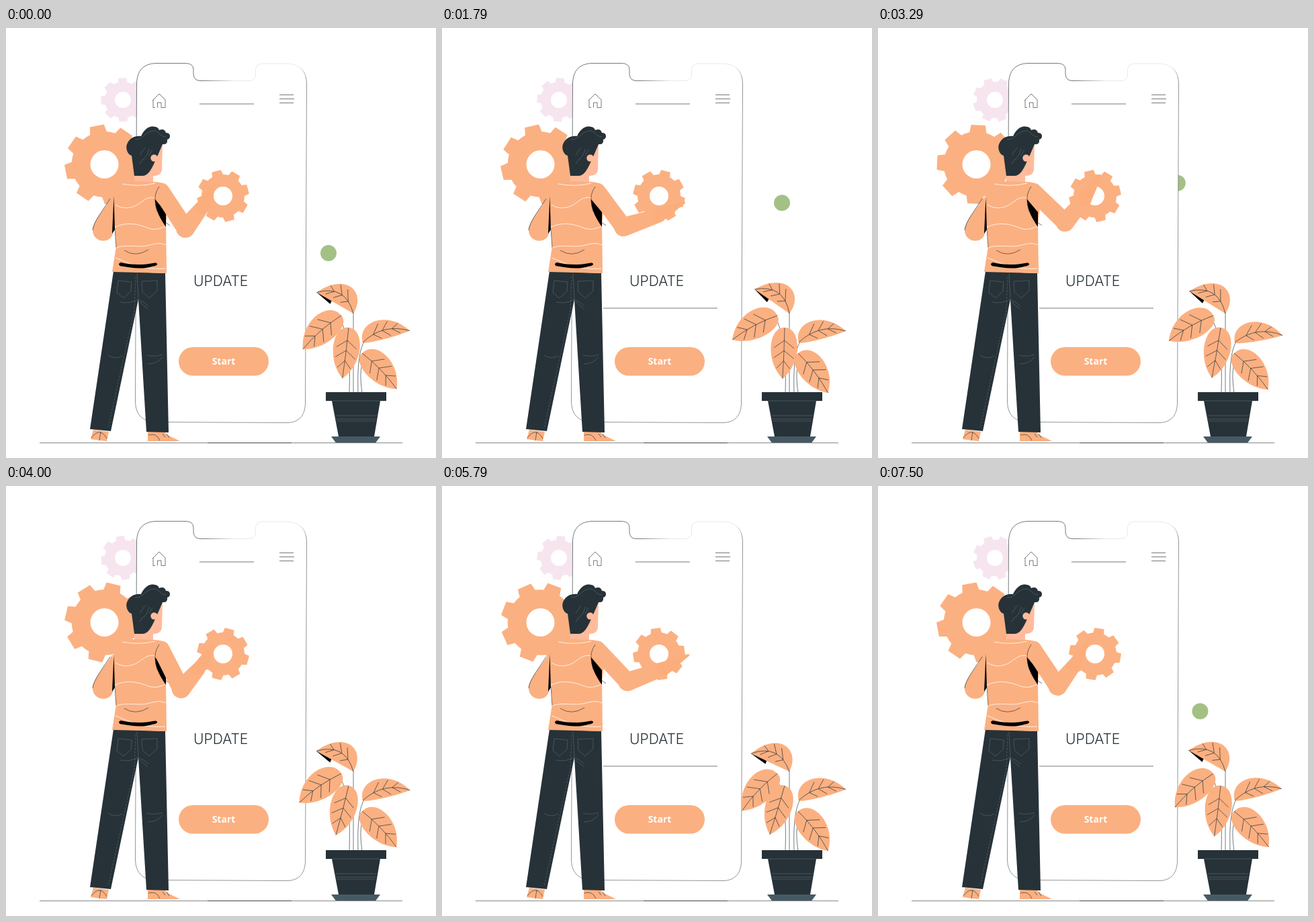
Recreate the animation shown at these times as an HTML page. Size 640 by 640 pixels, loop 7710 ms.

```html
<!DOCTYPE html>
<html lang="en">
<head>
<meta charset="utf-8">
<title>Update</title>
<style>
html, body { margin: 0; width: 100%; height: 100%; overflow: hidden; background: #fff; }
svg { display: block; width: 100%; height: 100%; }
.o { fill: #fbb081; }
.d { fill: #263238; }
.skin { fill: #ffbb9b; }
.l { fill: none; stroke: #263238; stroke-width: .65; }
.w { fill: none; stroke: #fff; stroke-width: .8; }
.s { fill: none; stroke: #66747b; stroke-width: .5; }
</style>
</head>
<body>
<svg viewBox="0 0 640 640">
  <defs>
    <linearGradient id="edge" gradientUnits="userSpaceOnUse" x1="375" y1="0" x2="448" y2="75">
      <stop offset="0" stop-color="#263238"/>
      <stop offset=".3" stop-color="#ddd"/>
      <stop offset=".8" stop-color="#ddd"/>
      <stop offset="1" stop-color="#555e63"/>
    </linearGradient>
    <clipPath id="side"><path d="M420 360H603V560H420Z"/></clipPath>
  </defs>

  <path id="pink" fill="#f6e5ef" fill-rule="evenodd"/>
  <path id="big" class="o" fill-rule="evenodd"/>
  <circle id="ball" r="12" fill="#a3c185"/>

  <!-- phone -->
  <path fill="#fff" stroke="url(#edge)" stroke-width=".65" d="M222 52.5H268Q279 53 279 62V69Q280 78.500 289 78.500H362Q371 78 371.500 70V62Q372 53 382 53H418Q447 54 447.500 83L445.500 560Q444 586 420 587.500L222 586.500Q193 585 192.500 556L194.500 81Q196 54 222 52.500Z"/>
  <path class="l" d="M218 108 228 98 237 107V118.500H231V111H225.500V118.500M219 107V118.500H222M407 99.500H428M407 105.500H429M407 111.500H428M288 113H369"/>
  <text x="279" y="383.700" fill="#263238" font-family="Inter, sans-serif" font-weight="300" font-size="21">UPDATE</text>
  <path id="bar" class="l"/>
  <rect class="o" x="257" y="475" width="134" height="42.500" rx="21.250"/>
  <text x="324" y="500.500" fill="#fff" text-anchor="middle" font-family="'Open Sans', sans-serif" font-weight="700" font-size="14">Start</text>
  <path id="small" class="o" fill-rule="evenodd"/>

  <!-- plant -->
  <path class="l" d="M511 543C512 500 512 462 496 430M517 543V424M524 543C523 505 525 480 534 465M530 543C526 515 528 500 535 488"/>
  <g id="leaves" clip-path="url(#side)"></g>
  <path class="d" d="M476 542H566V555H557L548 608H495L485 555H476Z"/>
  <path fill="#455a64" d="M484 608H557L550 617.500H491Z"/>
  <path class="s" d="M485 555H557M490 577H552M491 582H551M492 585H550"/>
  <path stroke="#888" d="M50 617.500H590"/>
  <path stroke="#444" d="M300 617.500H425"/>

  <!-- man -->
  <path class="o" d="M130 598 153 601 150 615 126 612ZM211 601H236C238 606 250 610 259 615H211Z"/>
  <path class="l" d="M127 610Q140 593 150 611M141 601 139 614M212 606Q224 602 229 614M233 604 237 609M239 604 243 610"/>
  <path class="d" d="M160 362 237 365 242 602 209 601 197 404 156 600 125 597Z"/>
  <path class="s" d="M167 376 187 378 186 392 175 402 165 394ZM202 377 225 376V391L213 402 203 393ZM195 365 197 404M170 408Q185 411 196 404 204 406 212 414M199 408 211 418M152 487Q162 494 173 488M210 487Q222 490 233 486M211 500Q226 500 233 489"/>
  <path class="s" stroke-dasharray="3 2" d="M193 370 191 420 152 595"/>
  <path class="skin" d="M190 180 233 172 232 211Q231 220 219 220V230L191 229Z"/>
  <path class="o" d="M159 250C145 272 128 289 129 302 130 313 140 319 150 316 159 313 160 304 163 290Z"/>
  <path class="l" d="M155 254C146 269 130 288 129 301"/>
  <path class="o" d="M160 250C162 238 168 231 191 228L220 229C234 229 241 234 244 245L238 292 239 365 158 363 164 325Z"/>
  <path d="M160.500 250 162 300 158 306Z"/>
  <path class="l" d="M162 298 164 327M176 331Q193 342 212 330M237 289 244 294"/>
  <path class="w" d="M173 232Q198 237 222 231M163 263C175 271 190 268 200 260 209 253 215 251 222 253M163 296C180 288 198 292 212 298 224 302 232 297 238 295M164 327C182 321 198 328 214 323 228 319 234 321 238 323M163 342C185 350 198 360 237 358"/>
  <path d="M171 349C186 353 205 353 222 349.500 227 350 226 354 219 354.500 202 360 187 357 172 354.500 167 354 167 350 171 349Z"/>
  <path d="M222 255Q221 272 238 296V274Z"/>
  <path id="arm" class="o"/>
  <path id="hand" fill="#fbae7b"/>
  <path class="l" d="M228 236Q219 248 223 265L225 273"/>
  <path class="d" d="M191 220 187 190C180 188 178 178 180 173 184 163 193 160 201 161 206 150 214 145 221 147Q226 147 228 152 236 149 238 156 244 156 244 161 244 165 240 166 241 174 233 173L227 187 222 198C216 212 211 220 203 220Z"/>
  <circle class="skin" cx="220.500" cy="193.500" r="5.200"/>
  <path class="s" d="M192 166C204 167 207 154 220 153 228 153 229 162 238 162M199 189 207 178M204 196Q211 190 213 180M199 202 204 195M213 190 218 181"/>
</svg>
<script>
const LOOP = 7710, END = 7500, STEP = 71.3;
const el = id => document.getElementById(id);
const draw = (id, d) => el(id).setAttribute('d', d);
const lerp = (a, b, k) => a + (b - a) * k;
const rad = deg => deg * Math.PI / 180;
const sin = deg => Math.sin(rad(deg));
const cos = deg => Math.cos(rad(deg));
const polar = ([x, y], r, deg) => [x + r * cos(deg), y + r * sin(deg)];

function gear(x, y, outer, hole, turn) {
  const root = outer * .82;
  const at = (r, deg) => polar([x, y], r, deg - 90);
  let d = 'M' + at(root, turn - 15);
  for (let a = turn; a < turn + 360; a += 45)
    d += `L${at(root, a - 15)}L${at(outer, a - 10.3)}L${at(outer, a + 10.3)}L${at(root, a + 15)}A${root} ${root} 0 0 1 ${at(root, a + 30)}`;
  return d + `ZM${x - hole} ${y}a${hole} ${hole} 0 1 0 ${2 * hole} 0a${hole} ${hole} 0 1 0 ${-2 * hole} 0Z`;
}

// Leaf lying along x, bulging to +down and -up, with a bent midrib and side veins
function leafPaths(len, down, up) {
  const side = w => `C${-.02 * len} ${1.2 * w} ${.65 * len} ${1.5 * w} ${len} 0`;
  const bend = (down - up) * .9;
  let veins = `M0 0Q${len / 2} ${bend} ${len} 0`;
  for (const k of [.25, .45, .65])
    for (const w of [down, -up]) {
      const y = 2 * k * (1 - k) * bend, x = k + .15;
      veins += `M${k * len} ${y}L${x * len} ${lerp(y, 4 * x * (1 - x) * w, .8)}`;
    }
  return `<path class="o" d="M0 0${side(down)}M0 0${side(-up)}"/><path class="l" d="${veins}"/>`;
}

// base, rest angle, length, bulges, then sway: offset, size, cycles per loop, phase
const leaves = [
  [517, 425, 210, 63, 32, -3, 0, 5, 1, 0],
  [499, 428, 138, 76, 24, 17, 5, 10, 1, -25],
  [510, 446, 97, 76, 19, 20, 3, 8, 1, 202],
  [531, 468, -14, 72, 3, 26, 5.5, 5.5, 4, -90],
  [530, 484, 45, 74, 17, 23, 4.5, 3.5, 2, -90]
].map(([x, y, rest, len, down, up, ...sway], i) => {
  const g = document.createElementNS('http://www.w3.org/2000/svg', 'g');
  const shade = i ? '' : '<path d="M63 0 37 5 38-13Z" transform="scale(1 -1)"/>';
  g.innerHTML = shade + leafPaths(len, down, up);
  el('leaves').append(g);
  return { g, x, y, rest, sway };
});

// Tapered bar with round ends
function limb(a, b, ra, rb) {
  const dir = Math.atan2(b[1] - a[1], b[0] - a[0]) * 180 / Math.PI;
  const p = (c, r) => polar(c, r, dir + 90);
  return `M${p(a, ra)}A${ra} ${ra} 0 0 1 ${p(a, -ra)}L${p(b, -rb)}A${rb} ${rb} 0 0 1 ${p(b, rb)}Z`;
}

function drawArm(p) {
  const shoulder = [231, 243];
  const reach = -35 - 17 * cos(p + 12);
  const elbow = polar(shoulder, 66, 54 + 17 * sin(p + 10));
  const wrist = polar(elbow, 48 - 9 * cos(p - 25), reach);
  const palm = polar(wrist, 21, reach - 9);
  const tip = polar(wrist, 42, reach - 9);
  draw('arm', limb(shoulder, elbow, 12.5, 13) + limb(elbow, wrist, 14, 10.5));
  draw('hand', limb(wrist, palm, 10, 7) + limb(palm, tip, 6, 1.8));
}

function frame(now) {
  const t = Math.min(END, Math.floor(now % LOOP / STEP) * STEP);
  const u = 360 * t / END;
  const turn = u + 9 * sin(u / 2);

  draw('pink', gear(174, 107, 33, 12, -1 - .93 * turn));
  draw('big', gear(146.5, 203, 59.5, 21, -11 - turn));
  draw('small', gear(323, 250, 39, 14, -15 + .82 * turn));

  const [bx, by] = polar([456.6, 285], 55.3, 65 - turn);
  el('ball').setAttribute('cx', bx);
  el('ball').setAttribute('cy', by);

  // The bar fills, rests, then vanishes
  const phase = (t + 1207) % 1959;
  draw('bar', phase < 1160 ? `M240 417H${240 + 170 * Math.min(1, phase / 560)}` : '');

  for (const { g, x, y, rest, sway: [mid, size, cycles, shift] } of leaves)
    g.setAttribute('transform', `translate(${x} ${y}) rotate(${rest + mid + size * sin(cycles * u + shift)})`);

  drawArm(2 * u);
  requestAnimationFrame(frame);
}
requestAnimationFrame(frame);
</script>
</body>
</html>
```
